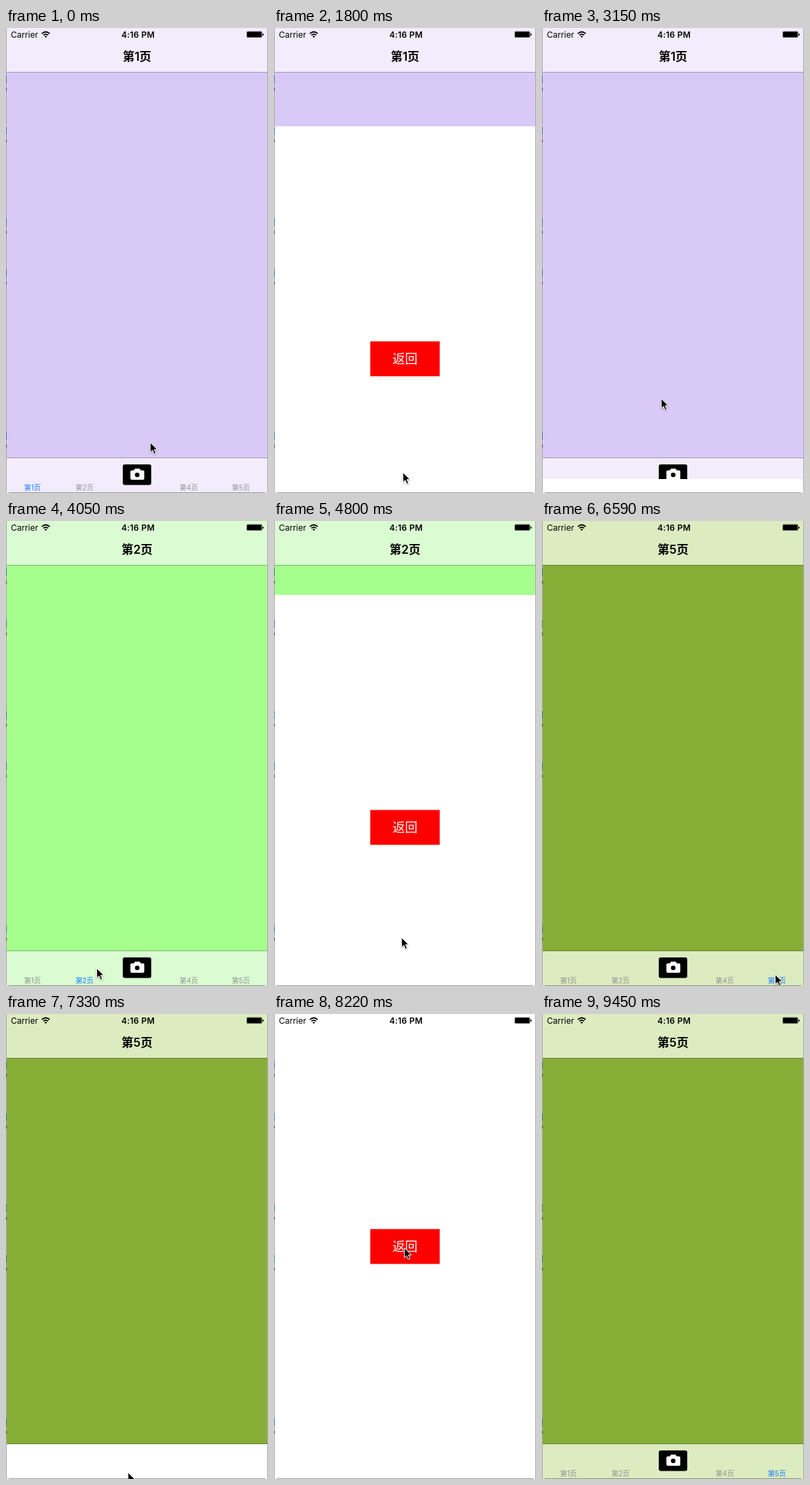
These frames come from a looping animation (377x667 px, 9470 ms). An HTML page:

```html
<!DOCTYPE html>
<html lang="zh-CN">
<head>
<meta charset="utf-8">
<title>Tab bar demo</title>
<style>
html, body { margin: 0; width: 100%; height: 100%; overflow: hidden; background: #fff; }
svg { display: block; width: 377px; height: 667px; }
text { font-family: Inter, "Noto Sans CJK SC", "Noto Sans CJK", sans-serif; }
.mid { text-anchor: middle; }
.tab { font-size: 10px; fill: #929292; }
.tab.on { fill: #107dfb; }
#cursor { filter: drop-shadow(0 1px 1px rgba(0, 0, 0, .35)); }
</style>
</head>
<body>
<svg viewBox="0 0 377 667">
  <rect id="body" width="377" height="667"/>
  <rect id="nav" width="377" height="63"/>
  <rect y="63" width="377" height="1" fill-opacity=".27"/>
  <text id="title" class="mid" x="188.5" y="47" font-size="17" font-weight="600"></text>
  <g id="bar">
    <rect y="616" width="377" height="1" fill-opacity=".27"/>
    <rect id="barBg" y="617" width="377" height="50"/>
    <rect x="168" y="626" width="41" height="29.5" rx="3"/>
    <path fill="#fff" d="M181 634.5H184L185.6 632H192.2L193.8 634.5H197Q199 634.5 199 636.5V646.3Q199 648 197 648H181Q179 648 179 646.3V636.5Q179 634.5 181 634.5Z"/>
    <circle cx="188.8" cy="641" r="3.3"/>
  </g>
  <g id="modal">
    <rect width="377" height="667" fill="#fff"/>
    <rect x="138.5" y="308.5" width="100" height="50" fill="#f00"/>
    <text class="mid" x="188.5" y="340" font-size="18" font-weight="300" fill="#fff">返回</text>
  </g>
  <g font-size="12">
    <text x="7" y="13.7">Carrier</text>
    <g fill="none" stroke="#000" stroke-width="1.8">
      <path d="M51.6 8.2Q57.2 2.9 62.8 8.2"/>
      <path d="M53.8 10.4Q57.2 7.3 60.6 10.4"/>
    </g>
    <path d="M55.3 11.9Q57.2 10.4 59.1 11.9L57.2 13.9Z"/>
    <text class="mid" x="190" y="13.7" font-weight="600" letter-spacing=".2">4:16 PM</text>
    <rect x="346" y="4.6" width="22.6" height="9.4" rx="1.8" fill-opacity=".5"/>
    <rect x="347" y="5.5" width="20.6" height="7.6" rx="1"/>
    <path d="M369 7.6Q370.6 8 370.6 9.4T369 11.2Z"/>
  </g>
  <g id="edge">
    <path stroke="#aaa6ad" d="M.5 0V667M376.5 0V667"/>
    <rect x="4" y="666" width="369" height="1" fill-opacity=".38"/>
  </g>
  <path id="cursor" stroke="#fff" stroke-linejoin="round"
    d="M.6 .6V14.6L3.9 11.6L6.2 17L8.6 16L6.3 10.7H10.8Z"/>
</svg>
<script>
const LOOP = 9470, H = 667, STEP = 149.3;
const $ = id => document.getElementById(id);

const pages = [
  { at: 0, n: 1, body: "#d9c9f6", bar: "#f2ecfd" },
  { at: 3560, n: 2, body: "#a6ff8d", bar: "#dbfbd2" },
  { at: 6400, n: 5, body: "#87ae37", bar: "#dcebc0" }
];

const sheets = [
  { at: 1670, close: 2912 },
  { at: 4640, close: 5524 },
  { at: 7297, close: 8390 }
];

// Pointer moves: leave, arrive, x, y
const home = [207, 594];
const moves = [
  [350, 1190, 185, 637],   // camera
  [1800, 2680, 181, 337],  // back
  [2915, 3480, 112, 646],  // second tab
  [3560, 4500, 183, 640],
  [4731, 5360, 201, 337],
  [5609, 6400, 338, 648],  // last tab
  [6480, 7200, 175, 657],
  [7340, 8210, 187, 335],
  [8420, 9100, 230, -30]   // off stage
];

function add(parent, tag, attrs, label = "") {
  const el = document.createElementNS("http://www.w3.org/2000/svg", tag);
  for (const k in attrs) el.setAttribute(k, attrs[k]);
  el.textContent = label;
  $(parent).append(el);
  return el;
}

const tabs = [1, 2, 4, 5].map(n => ({
  n, el: add("bar", "text", { x: 75 * n - 37, y: 662.8 }, `第${n}页`)
}));

// Slivers of the window behind, seen along the left edge.
[68, 142, 273, 346, 580].forEach(y => {
  add("edge", "rect", { y, width: 1, height: 11, fill: "#3d78a8" });
  add("edge", "rect", { y: y + 18, width: 1, height: 4, fill: "#45404c" });
});

const last = (list, t) => list.filter(v => v.at <= t).pop();

// Critically damped spring: the share of the distance still to go.
function rest(ms) {
  const x = ms * 0.024;
  return (1 + x) * Math.exp(-x);
}

function sheetTop(t) {
  const s = last(sheets, t);
  if (!s) return H;
  return H * (t < s.close ? rest(t - s.at) : 1 - rest(t - s.close));
}

// Each move bends: the height changes first, the sideways part follows.
function pointer(t) {
  let [x, y] = home;
  for (const [leave, arrive, toX, toY] of moves) {
    const k = Math.min(1, Math.max(0, (t - leave) / (arrive - leave)));
    x += (toX - x) * k * k;
    y += (toY - y) * (1 - (1 - k) ** 2);
  }
  return [x, y].map(Math.round);
}

const move = (id, x, y) => $(id).setAttribute("transform", `translate(${x} ${y})`);
const fill = (id, color) => $(id).setAttribute("fill", color);

function draw(time) {
  const t = Math.floor(time / STEP) * STEP;
  const page = last(pages, t);
  fill("body", page.body);
  fill("nav", page.bar);
  fill("barBg", page.bar);
  $("title").textContent = `第${page.n}页`;
  tabs.forEach(({ n, el }) => el.setAttribute("class", n === page.n ? "tab mid on" : "tab mid"));
  move("modal", 0, Math.round(sheetTop(t)));
  move("cursor", ...pointer(t));
}

const start = performance.now();
function tick() {
  draw((performance.now() - start) % LOOP);
  requestAnimationFrame(tick);
}
tick();
</script>
</body>
</html>
```
